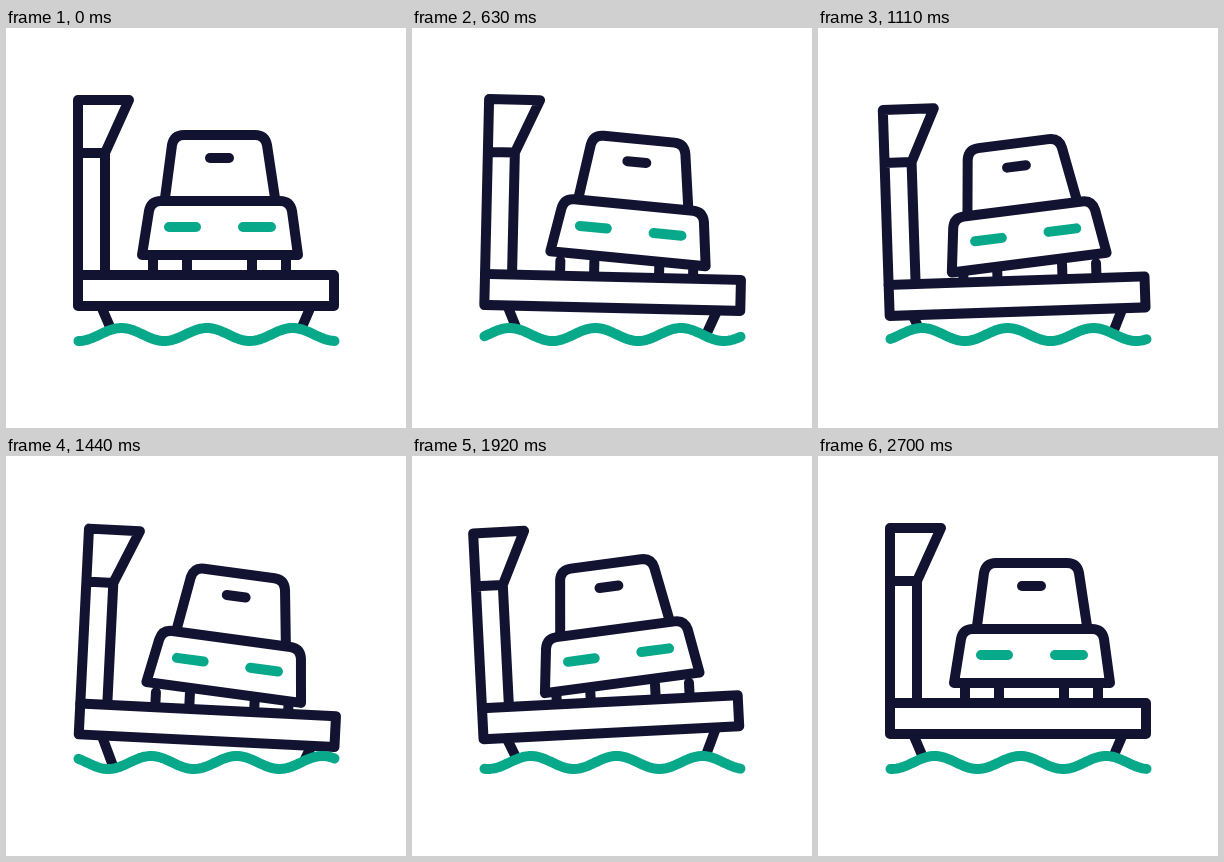
Write an HTML page that moves like this. It is 400 px wide and 400 px high and loops after 2.73 s.

```html
<!DOCTYPE html>
<html lang="en">
<head>
<meta charset="utf-8">
<title>Car ferry</title>
<style>
  html, body { margin: 0; width: 100%; height: 100%; overflow: hidden; background: #fff; }
  svg { display: block; width: 100%; height: 100%; }
  path { stroke-width: 10; stroke-linecap: round; stroke-linejoin: round; fill: none; stroke: #121331; }
  .solid { fill: #fff; }
  .teal { stroke: #08a88a; }
</style>
</head>
<body>
<svg viewBox="0 0 400 400">
  <clipPath id="above"><path id="air"/></clipPath>
  <g clip-path="url(#above)">
    <g id="ferry">
      <path d="M95 278L110 313M305 278L290 313"/>
      <path d="M147 232V245M181 232V245M246 232V245M280 232V245"/>
      <g id="car">
        <path class="solid" d="M159 170L166 117Q168 107 178 107H249Q259 107 261 117L269 170"/>
        <path d="M204 130H223"/>
        <path class="solid" d="M136 227L143 183Q145 173 155 173H274Q284 173 286 183L292 227Z"/>
        <path class="teal" d="M163 199H190M237 199H265"/>
      </g>
      <path d="M72 247V72H123L99 125V247M72 125H99"/>
      <path class="solid" d="M72 247H328V278H72Z"/>
    </g>
  </g>
  <path id="wave" class="teal"/>
</svg>
<script>
const LOOP = 2730, STEP = 30, LEFT = 72.5, RIGHT = 329.5;
const WAVELENGTH = (RIGHT - LEFT) / 3;
const $ = id => document.getElementById(id);

// Keys are [time, value] pairs
const tilt = [[0, 0], [480, 2.6], [960, -3.1], [1470, 2.9], [1980, -3.1], [2390, 0.9], [2700, 0], [LOOP, 0]];
const bob = [[0, 0], [360, 8], [800, -1], [1270, 8], [1980, -1.5], [2250, 2], [2700, 0], [LOOP, 0]];
const sway = [[0, 0], [510, 5.7], [1025, -6.2], [1520, 5.6], [2010, -5.6], [2400, 1], [2700, 0], [LOOP, 0]];
const flow = [[0, 0], [160, 10], [630, 68], [1110, 160], [2310, 309], [2500, 333], [2600, 341], [2700, 344], [LOOP, 344]];

const linear = u => u;
const sine = u => (1 - Math.cos(Math.PI * u)) / 2;

function at(keys, t, ease = sine) {
  const i = keys.findIndex(k => k[0] > t);
  const [t0, v0] = keys[i - 1], [t1, v1] = keys[i];
  return v0 + (v1 - v0) * ease((t - t0) / (t1 - t0));
}

function waveLine(shift) {
  const points = [];
  for (let x = LEFT; x <= RIGHT; x += 2) {
    const y = 306.5 + 6.5 * Math.cos(2 * Math.PI * (x - LEFT - shift) / WAVELENGTH);
    points.push(x + " " + y.toFixed(2));
  }
  return points.join("L");
}

function draw(now) {
  const t = Math.floor(now % LOOP / STEP) * STEP;
  const line = waveLine(at(flow, t, linear));
  const lean = at(sway, t);
  $("wave").setAttribute("d", "M" + line);
  $("air").setAttribute("d", `M0 0V306L${line}L400 306V0Z`);
  $("ferry").setAttribute("transform", `translate(0 ${at(bob, t)}) rotate(${at(tilt, t)} 200 290)`);
  $("car").setAttribute("transform", `translate(0 ${0.08 * lean * lean}) rotate(${lean} 214 235)`);
}

const start = performance.now();
function tick() {
  draw(performance.now() - start);
  requestAnimationFrame(tick);
}
tick();
</script>
</body>
</html>
```
